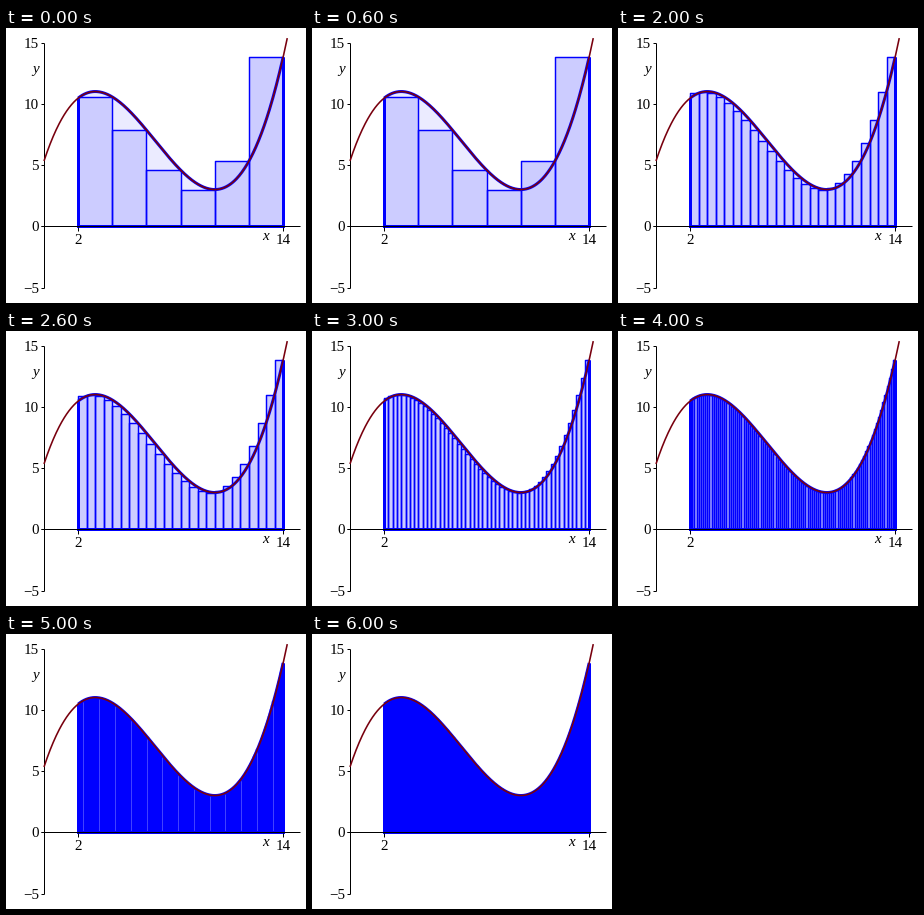
These frames come from a looping animation (300x275 px, 7000 ms). A matplotlib script:

```python
import numpy as np
import matplotlib.pyplot as plt
from matplotlib.animation import FuncAnimation
from matplotlib.collections import PolyCollection

W, H, DPI = 300, 275, 100
PX = 72 / DPI  # one pixel in points
A, B = 2, 14
BLUE, RED = "#0000ff", "#78000e"
RECT_FILL, AREA_FILL = "#ccccff", "#ebebff"


def f(x):
    """Cubic with a maximum of 11 at x = 3 and a minimum of 3 at x = 10."""
    return 48 / 343 * (x**3 / 3 - 6.5 * x**2 + 30 * x) + 16 / 3


def sx(x):
    return 38 + 17.083 * x


def sy(y):
    return 198.3 - 12.25 * y


fig = plt.figure(figsize=(W / DPI, H / DPI), dpi=DPI, facecolor="white")
ax = fig.add_axes([0, 0, 1, 1])
ax.set_xlim(0, W)
ax.set_ylim(H, 0)
ax.axis("off")


def line(xs, ys, color="black", width=1.0, z=5):
    ax.plot(xs, ys, color=color, lw=width * PX, zorder=z,
            solid_capstyle="butt", solid_joinstyle="miter")


def label(x, y, text, ha="center", style="normal"):
    ax.text(x, y, text, ha=ha, va="baseline", fontsize=15 * PX,
            family="Liberation Serif", style=style, zorder=7)


# Region under the curve and its heavy outline; straight sides snap to pixels
xs = np.linspace(A, B, 300)
ax.fill_between(sx(xs), sy(f(xs)), sy(0), color=AREA_FILL, lw=0, zorder=1)
line(sx(xs), sy(f(xs)), BLUE, 3, z=4)
sides = np.array([(A, f(A)), (A, 0), (B, 0), (B, f(B))])
line(sx(sides[:, 0]), sy(sides[:, 1]), BLUE, 3, z=4)

# Axes, ticks and labels
line([35, 294], [sy(0)] * 2)
line([sx(0)] * 2, [15, 260])
for v in (15, 10, 5, 0, -5):
    line([35, 38], [sy(v)] * 2)
    label(33, sy(v) + 5, str(v).replace("-", "\u2212"), ha="right")
for v in (A, B):
    line([sx(v)] * 2, [199, 203])
    label(sx(v), 216, str(v))
label(259, 212, "x", style="italic")
label(29.5, 45, "y", style="italic")

# Function graph
xs = np.linspace(0, 14.24, 400)
line(sx(xs), sy(f(xs)), RED, 1.6, z=6)

fills = PolyCollection([], facecolors=RECT_FILL, edgecolors="none", zorder=2)
edges = PolyCollection([], facecolors="none", edgecolors=BLUE,
                       linewidths=1.45 * PX, zorder=3)
ax.add_collection(fills)
ax.add_collection(edges)


def update(i):
    """Right-endpoint rectangles; their number doubles at each step."""
    grid = np.linspace(A, B, 6 * 2**i + 1)
    boxes = []
    for left, right in zip(grid[:-1], grid[1:]):
        l, r, top, base = sx(left), sx(right), sy(f(right)), sy(0)
        boxes.append([(l, base), (l, top), (r, top), (r, base)])
    fills.set_verts(boxes)
    edges.set_verts(boxes)
    return fills, edges


anim = FuncAnimation(fig, update, frames=7, interval=1000, repeat=True,
                     repeat_delay=0, blit=False)
plt.show()
```
